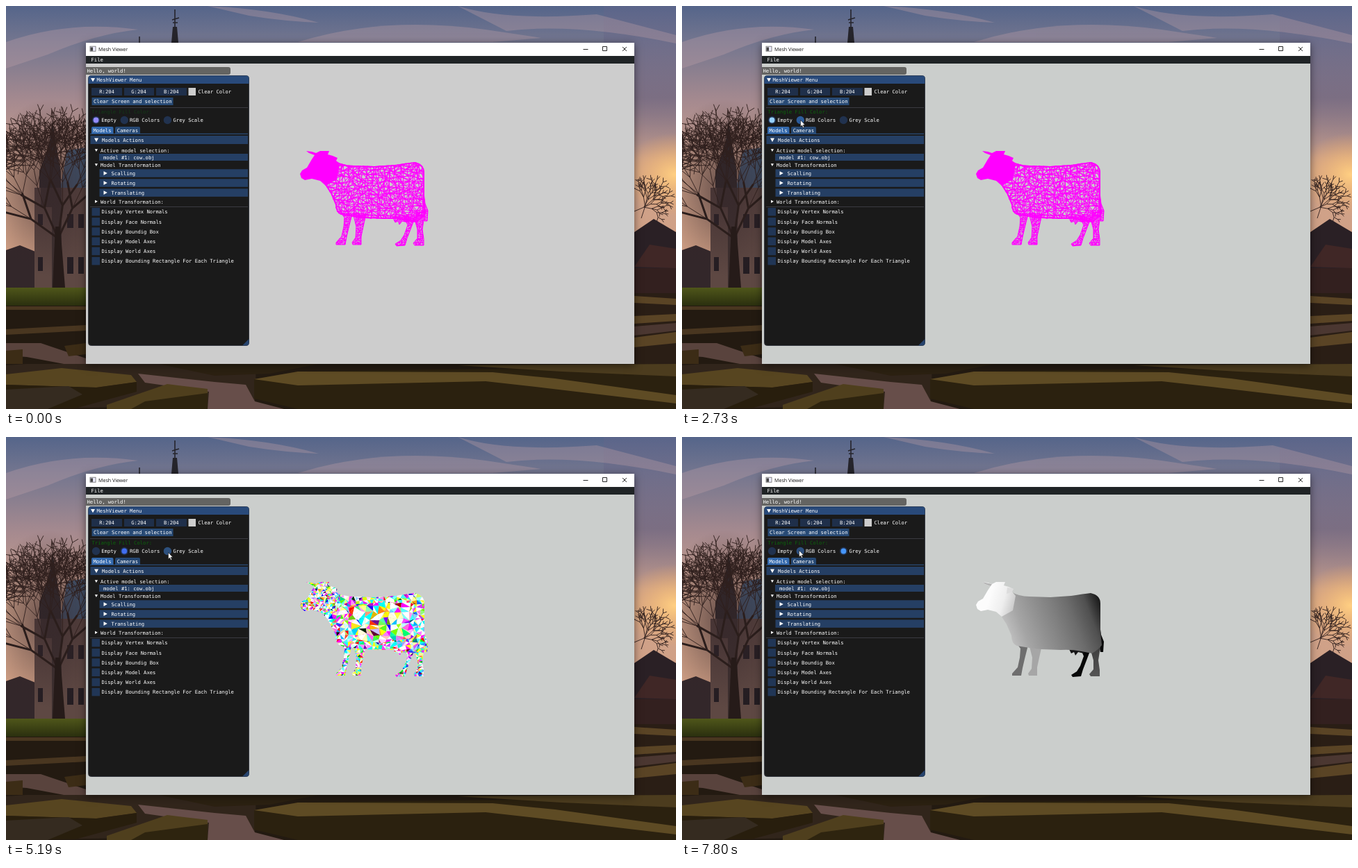
Recreate the animation shown at these times as an HTML page with a canvas. Size 964 px wide and 581 px high, loop 8000 ms.

```html
<!DOCTYPE html>
<html lang="en">
<head>
<meta charset="utf-8">
<title>Mesh Viewer</title>
<style>
html, body { margin: 0; width: 100%; height: 100%; overflow: hidden; background: #231a11; }
#stage { position: absolute; left: 0; top: 0; width: 964px; height: 581px; overflow: hidden; }
#stage > * { position: absolute; left: 0; top: 0; }
svg { display: block; }
text { font: 7.2px "DejaVu Sans Mono", "Liberation Mono", monospace; fill: #fff; text-rendering: geometricPrecision; white-space: pre; }
.title { font: 7.1px "Open Sans", "Noto Sans", sans-serif; fill: currentColor; }

#stage > #win { left: 115px; top: 53px; width: 789px; height: 463px; background: #cdcdcd; box-shadow: 0 2px 11px rgba(0,0,0,.5); }
#stage > #view { left: 421px; top: 206px; width: 190px; height: 142px; overflow: hidden; }
#mesh { display: block; }
.anim { animation: 8s step-end infinite; }

#win { animation-name: focus; }
@keyframes focus {
  .25% { box-shadow: 0 1px 6px rgba(0,0,0,.28); }
  28.625% { box-shadow: 0 2px 11px rgba(0,0,0,.5); background: #cbcecc; }
}
#bar { color: #111; animation-name: ink; }
@keyframes ink { .25% { color: #999; } 28.625% { color: #111; } }
#label { fill: #143a18; animation-name: label; }
@keyframes label { .25% { fill: #00b400; } 28.625% { fill: #0c640c; } }

.ring { fill: #21324f; }
.dot { fill: transparent; }
#dotEmpty { fill: #938bff; animation-name: empty; }
@keyframes empty { .25% { fill: #3572b5; } 28.625% { fill: #96d0ff; } 44.625% { fill: transparent; } }
#ringRgb { animation-name: ringRgb; }
@keyframes ringRgb {
  34.125% { fill: #2c5c9b; }
  39.375% { fill: #2d5fa6; }
  54.375% { fill: #21324f; }
  97.5% { fill: #2d5080; }
}
#dotRgb { animation-name: dotRgb; }
@keyframes dotRgb { 39.375% { fill: #4b8cf5; } 54.375% { fill: #416ef0; } 85.625% { fill: transparent; } }
#ringGrey { animation-name: ringGrey; }
@keyframes ringGrey { 55.25% { fill: #2d507d; } 74.375% { fill: #2d5fa6; } 80% { fill: #2d507d; } 97.5% { fill: #21324f; } }
#dotGrey { animation-name: dotGrey; }
@keyframes dotGrey { 80% { fill: #4696fa; } }

#mesh { animation-name: strip; }
@keyframes strip {
  39.375% { transform: translateY(-142px); }
  44.625% { transform: translateY(-284px); }
  50.25% { transform: translateY(-426px); }
  55.25% { transform: translateY(-568px); }
  60% { transform: translateY(-710px); }
  64.875% { transform: translateY(-852px); }
  69.5% { transform: translateY(-994px); }
  74.375% { transform: translateY(-1136px); }
  80% { transform: translateY(-1278px); }
}

#click { opacity: 0; animation-name: click; }
@keyframes click {
  24.875% { opacity: .47; transform: translate(170.5px, 164px); }
  26.375% { opacity: 0; }
  65.875% { opacity: .47; transform: translate(233px, 166px); }
  67.125% { opacity: 0; }
}
#cursor { transform: translate(-30px, -30px); animation-name: move; }
@keyframes move {
  6.25% { transform: translate(897px, 542px); animation-timing-function: steps(7); }
  10% { transform: translate(581px, 256px); animation-timing-function: steps(5); }
  12.5% { transform: translate(385px, 198px); animation-timing-function: steps(6); }
  15.875% { transform: translate(228px, 173px); }
  16.375% { transform: translate(222px, 172px); animation-timing-function: steps(7); }
  20.125% { transform: translate(174px, 165px); }
  22.125% { transform: translate(172px, 165px); }
  22.75% { transform: translate(170px, 164px); }
  44.625% { transform: translate(170px, 164px); animation-timing-function: steps(6); }
  48.5% { transform: translate(233px, 166px); }
  77.5% { transform: translate(232px, 166px); }
  85.625% { transform: translate(232px, 166px); animation-timing-function: steps(13); }
  95% { transform: translate(168px, 163px); }
}
</style>
</head>
<body>
<div id="stage">

<!-- garden backdrop -->
<svg width="964" height="581">
  <defs>
    <linearGradient id="sky" x2="0" y2="1">
      <stop offset="0" stop-color="#55658a"/><stop offset=".12" stop-color="#74768f"/>
      <stop offset=".32" stop-color="#a68a8f"/><stop offset=".55" stop-color="#d0a48c"/>
      <stop offset="1" stop-color="#cf9c80"/>
    </linearGradient>
    <linearGradient id="dusk" x2="0" y2="1">
      <stop offset="0" stop-color="#66658a" stop-opacity=".3"/><stop offset=".6" stop-color="#66607c" stop-opacity=".65"/>
      <stop offset="1" stop-color="#66607c" stop-opacity="0"/>
    </linearGradient>
    <radialGradient id="glow"><stop offset="0" stop-color="#ffcf82"/><stop offset="1" stop-color="#f0a860" stop-opacity="0"/></radialGradient>
    <radialGradient id="crown"><stop offset=".2" stop-color="#35262a" stop-opacity=".55"/><stop offset="1" stop-color="#35262a" stop-opacity="0"/></radialGradient>
    <linearGradient id="grass" x2="0" y2="1"><stop offset="0" stop-color="#4f561a"/><stop offset="1" stop-color="#282c0e"/></linearGradient>
  </defs>
  <rect width="964" height="432" fill="url(#sky)"/>
  <rect x="860" width="104" height="220" fill="url(#dusk)"/>
  <g fill="#bd9fa6" opacity=".35">
    <path d="M0 52Q90 20 190 34Q130 40 60 70L0 90Z"/>
    <path d="M290 0Q380 4 450 24Q400 22 350 14Z"/>
    <path d="M420 52Q540 14 690 34L770 46 700 52Z"/>
    <path d="M650 0Q720 22 850 12L964 42V54Q820 24 720 36Z"/>
  </g>
  <ellipse cx="962" cy="243" rx="75" ry="60" fill="url(#glow)"/>
  <path d="M243 5V52M239 20L249 17M240 24H247M192 44V53" stroke="#25242b" stroke-width="1.6"/>
  <path d="M240 30H246L248 53H238Z" fill="#25242b"/>

  <path d="M0 352L20 345 42 354V406H0Z" fill="#33272a"/>
  <path d="M41 262H115V406H41Z" fill="#5e4843"/>
  <path d="M78 262L88 208 116 204V262Z" fill="#435a76"/>
  <path d="M62 200L67 165 72 200 79 238V262H48V238Z" fill="#2b2527"/>
  <path d="M50 262H80V406H66V290H50Z" fill="#3d302f"/>
  <path d="M46 300h7v16h-7zM46 362h7v20h-7zM88 300h9v20h-9zM88 362h9v24h-9zM104 300h8v20h-8zM104 362h8v24h-8z" fill="#241d22"/>
  <ellipse cx="62" cy="262" rx="92" ry="128" fill="url(#crown)"/>
  <path id="limbs" fill="none" stroke="#2b1e1c" stroke-width="3" stroke-linecap="round"/>
  <path id="twigs" fill="none" stroke="#2f201d" stroke-width=".9"/>
  <path d="M67 406L71 318H78L85 406Z" fill="#261b19"/>

  <path d="M904 326L932 307 964 326V416H904Z" fill="#2a2025"/>
  <path d="M904 376L926 344 964 350V378Z" fill="#402726"/>
  <path d="M904 378H964V416H904Z" fill="#33201f"/>

  <rect y="406" width="120" height="28" fill="url(#grass)"/>
  <rect y="432" width="964" height="149" fill="#231a11"/>
  <rect x="900" y="414" width="64" height="102" fill="#2a1e15"/>
  <path d="M904 418L964 422V431L904 428ZM904 447L964 444V454L904 458ZM904 478L964 470V486L904 492Z" fill="#5a4425"/>
  <path d="M904 462L964 457V468L904 475Z" fill="#4b3731"/>
  <path d="M0 433H115V438H0ZM0 466L115 460V468L0 474Z" fill="#493620"/>
  <path d="M0 486L50 486 115 508V522L30 506 0 504Z" fill="#59433d"/>
  <path d="M0 497L24 495V516H0ZM84 490L115 486V502L90 505Z" fill="#3c2c16"/>
  <path d="M30 516H360L358 575 0 581V518Z" fill="#31251b"/>
  <path d="M0 531L80 522 180 532 188 542 130 550 0 546Z" fill="#574520"/>
  <path d="M0 546L130 550 188 542V556L100 580H0Z" fill="#281e0d"/>
  <path d="M0 553L90 548 110 560 60 581H0Z" fill="#352b20"/>
  <path d="M190 530L300 542 345 546 358 570 400 581H290L292 556 200 543Z" fill="#674e4a"/>
  <path d="M220 516H450L380 530 300 533Z" fill="#2b2011"/>
  <path d="M145 575L232 545 290 552V581H145Z" fill="#4f3f1d"/>
  <path d="M200 570L290 558V581H180Z" fill="#2e240f"/>
  <path d="M357 538L420 527 640 524 964 520V581H420L357 566Z" fill="#2b210f"/>
  <path d="M357 538L420 527 700 528 790 537 964 561V573L770 550 690 541 420 547Z" fill="#5e4b24"/>
  <path d="M650 518L964 516V534L800 527Z" fill="#4c3c1e"/>
</svg>

<div id="win" class="anim"></div>

<!-- application window -->
<svg width="964" height="581">
  <rect x="115" y="53" width="789" height="19" fill="#fff"/>
  <g id="bar" class="anim" fill="none" stroke="currentColor" stroke-width=".9">
    <text class="title" stroke="none" x="133" y="65">Mesh Viewer</text>
    <rect x="121" y="58.2" width="8" height="7" fill="#eef" stroke="#777"/>
    <rect x="121.5" y="59.5" width="3.6" height="5.2" fill="#444" stroke="none"/>
    <path d="M830.500 62.500H837.500M858.500 58.500H864.500V64.500H858.500ZM887 59L893 65M893 59L887 65"/>
  </g>
  <rect x="115" y="72" width="789" height="11" fill="#202426"/>
  <text x="122.500" y="80.300">File</text>
  <path d="M115 88H320Q323 88 323 91V96Q323 99 320 99H115Z" fill="#646462"/>
  <text x="116.500" y="96.300">Hello, world!</text>

  <rect x="118.500" y="100.500" width="231" height="389" rx="4" fill="#1a1a1a" stroke="#34373f"/>
  <path d="M118.500 112V104Q118.500 100.500 122 100.500H346Q349.500 100.500 349.500 104V112Z" fill="#294a7a"/>
  <path d="M349.500 480V486Q349.500 489.500 346 489.500H340Z" fill="#27446e"/>

  <g fill="#1f2f4a">
    <rect x="123" y="118" width="44" height="11"/><rect x="170" y="118" width="43" height="11"/><rect x="216" y="118" width="44" height="11"/>
  </g>
  <rect x="262.500" y="118" width="10.500" height="11" fill="#cdcdcd"/>
  <rect x="123.500" y="132" width="117" height="11" fill="#284a75"/>
  <path d="M121 146.500H348M121 289.500H348" stroke="#43434c" stroke-width=".8"/>
  <path d="M123 184V176Q123 174 125 174H152.500Q154.500 174 154.500 176V184Z" fill="#3369ad"/>
  <path d="M157 184V176Q157 174 159 174H191Q193 174 193 176V184Z" fill="#264873"/>
  <path d="M121 184.300H348" stroke="#3369ad" stroke-width=".8"/>
  <g fill="#253f64">
    <rect x="121.500" y="187" width="226.500" height="12"/>
    <rect x="134" y="213" width="214" height="10"/>
    <rect x="134.500" y="235.300" width="213.500" height="11.500"/><rect x="134.500" y="249.300" width="213.500" height="11.500"/><rect x="134.500" y="263.400" width="213.500" height="11.500"/>
  </g>
  <g fill="#fff">
    <path d="M122 104H128L125 109.300ZM127 190.600H133L130 195.900Z"/>
    <path d="M127.800 206.200H132L129.900 210ZM127.800 227.200H132L129.900 231Z"/>
    <path d="M140.500 238.200V244L145.800 241.100ZM140.500 252.200V258L145.800 255.100ZM140.500 266.200V272L145.800 269.100ZM128 279.700V284L131.900 281.850Z"/>
  </g>
  <g id="boxes" fill="#213656"></g>

  <g>
    <circle class="ring" cx="129.500" cy="164.500" r="5.700"/><circle id="dotEmpty" class="dot anim" cx="129.500" cy="164.500" r="3.900"/>
    <circle id="ringRgb" class="ring anim" cx="170.300" cy="164.500" r="5.700"/><circle id="dotRgb" class="dot anim" cx="170.300" cy="164.500" r="3.900"/>
    <circle id="ringGrey" class="ring anim" cx="232.400" cy="164.500" r="5.700"/><circle id="dotGrey" class="dot anim" cx="232.400" cy="164.500" r="3.900"/>
  </g>

  <text x="130.500" y="109.200">MeshViewer Menu</text>
  <text x="134.300" y="126.200">R:204</text><text x="180.300" y="126.200">G:204</text><text x="227" y="126.200">B:204</text>
  <text x="276.500" y="126.200">Clear Color</text>
  <text x="126" y="140.300">Clear Screen and selection</text>
  <text id="label" class="anim" x="123.500" y="155.200">Triangle Fill Color:</text>
  <text x="137.300" y="167.300">Empty</text><text x="178" y="167.300">RGB Colors</text><text x="240.500" y="167.300">Grey Scale</text>
  <text x="125.500" y="181.700">Models</text><text x="159.700" y="181.700">Cameras</text>
  <text x="138" y="195.800">Models Actions</text>
  <text x="136" y="210.600">Active model selection:</text>
  <text x="140" y="220.900">model #1: cow.obj</text>
  <text x="136" y="231.700">Model Transformation</text>
  <text x="151.500" y="243.800">Scalling</text>
  <text x="151.500" y="257.800">Rotating</text>
  <text x="151.500" y="271.900">Translating</text>
  <text x="136" y="284.700">World Transformation:</text>
  <text x="137.500" y="299.300">Display Vertex Normals</text>
  <text x="137.500" y="313.500">Display Face Normals</text>
  <text x="137.500" y="327.700">Display Boundig Box</text>
  <text x="137.500" y="341.900">Display Model Axes</text>
  <text x="137.500" y="356.100">Display World Axes</text>
  <text x="137.500" y="370.300">Display Bounding Rectangle For Each Triangle</text>
</svg>

<div id="view"><canvas id="mesh" class="anim" width="190" height="1420"></canvas></div>

<svg width="964" height="581">
  <circle id="click" class="anim" r="7.500" fill="#ff0"/>
  <g id="cursor" class="anim"><path d="M.5 .5V9.900L2.600 8 4.100 11.500 5.700 10.800 4.200 7.500H7.100Z" fill="#fff" stroke="#111" stroke-width=".6"/></g>
</svg>
</div>

<script>
const $ = id => document.getElementById(id);
const hash = (a, b, c) => {
  const v = Math.sin(a * 127.1 + b * 311.7 + c * 74.7) * 43758.5453;
  return v - Math.floor(v);
};

// check boxes
$('boxes').innerHTML = [0, 1, 2, 3, 4, 5].map(i =>
  `<rect x="123.5" y="${290.9 + i * 14.2}" width="11.5" height="11.5"/>`).join('');

// bare trees
let limbs = '', twigs = '', count = 0;
function branch(x, y, angle, len, depth) {
  const r = hash(++count, depth, 3), a = angle + (r - .5) * .35;
  const x2 = x + Math.cos(a) * len, y2 = y + Math.sin(a) * len;
  const line = `M${x.toFixed(1)} ${y.toFixed(1)}L${x2.toFixed(1)} ${y2.toFixed(1)}`;
  if (depth > 5) limbs += line; else twigs += line;
  if (!depth) return;
  const spread = .35 + r * .3;
  branch(x2, y2, a - spread, len * (.74 + r * .1), depth - 1);
  branch(x2, y2, a + spread, len * (.84 - r * .1), depth - 1);
  if (depth > 3) branch(x2, y2, a, len * .7, depth - 2);
}
for (const lean of [-2.5, -2, -1.57, -1.1]) branch(75, 335, lean, 48, 7);
branch(914, 306, -1.1, 18, 5);
branch(904, 296, -.5, 15, 5);
$('limbs').setAttribute('d', limbs);
$('twigs').setAttribute('d', twigs);

// cow
const head = new Path2D('M432 209L440 210 446 212 452 209 465 209 463 214 470 216 477 219 475 223 480 229 476 250 460 259 452 252 440 249 430 251 425 248 423 242 426 237 433 233 440 221 444 215 436 212Z');
const body = new Path2D('M472 222Q484 230 500 230L530 231 560 229Q578 226 588 225Q602 228 602 240L602 280 604 300Q600 306 590 312L575 309Q560 306 545 307L517 306 500 304 482 301Q474 298 474 286L467 270 458 256Z');
const foreFar = new Path2D('M482 298L487 305 486 318 483 332 475 341 475 344 488 344 490 333 493 320 498 300Z');
const foreNear = new Path2D('M499 298L504 318 503 334 498 341 499 344 511 344 511 332 514 318 518 300Z');
const hindFar = new Path2D('M572 302L578 316 573 330 568 338 560 343 562 346 574 345 577 335 582 322 588 306Z');
const hindNear = new Path2D('M586 300L592 322 592 335 586 342 588 345 601 345 601 336 599 322 603 296Z');
const tail = new Path2D('M600 262L603 285 607 295 606 310 602 310 600 300Z');
const udder = new Path2D('M556 304L560 312 564 310 566 315 570 310 578 312 580 304Z');
const flank = new Path2D('M494 244L530 239 582 239 588 262 582 290 540 297 505 292 492 270Z');
const limbParts = [foreFar, hindFar, tail, udder, foreNear, hindNear];
const ctx = $('mesh').getContext('2d');

// jittered triangles of a given size, clipped to one part
function triangles(part, size, salt, paint) {
  const corner = (i, j) => [
    421 + (i + hash(i, j, salt) * .8 - .4) * size * 1.1,
    206 + (j + hash(j, i, salt + 9) * .8 - .4) * size
  ];
  ctx.save();
  ctx.clip(part);
  for (let i = -1; i * size * 1.1 < 195; i++) for (let j = -1; j * size < 147; j++) {
    const a = corner(i, j), b = corner(i + 1, j), c = corner(i + 1, j + 1), d = corner(i, j + 1);
    const pair = hash(i, j, salt + 5) < .5 ? [[a, b, c], [a, c, d]] : [[a, b, d], [b, c, d]];
    pair.forEach((tri, k) => {
      ctx.beginPath();
      tri.forEach(p => ctx.lineTo(...p));
      ctx.closePath();
      paint(i, j, k);
    });
  }
  ctx.restore();
}

function wire() {
  const stroke = () => ctx.stroke();
  ctx.strokeStyle = ctx.fillStyle = '#f0f';
  ctx.lineWidth = .75;
  ctx.fill(head);
  limbParts.forEach(p => triangles(p, 3, 2, stroke));
  triangles(body, 6, 1, stroke);
  triangles(body, 8, 4, stroke);
  ctx.save();
  ctx.clip(body);
  ctx.lineWidth = 4;
  ctx.stroke(body);
  ctx.restore();
  ctx.lineWidth = 1;
  limbParts.forEach(p => ctx.stroke(p));
}

function confetti(seed) {
  const fill = salt => (i, j, k) => {
    const level = n => Math.max(0, Math.min(255, (hash(i + seed * 13, j + k * 57, n + salt) * 3 - .35) * 255 | 0));
    ctx.fillStyle = `rgb(${level(1)},${level(2)},${level(3)})`;
    ctx.fill();
  };
  limbParts.forEach(p => triangles(p, 3.5, 2, fill(20)));
  triangles(body, 5, 1, fill(30));
  triangles(flank, 8, 4, fill(40));
  triangles(head, 3.2, 6, fill(50));
}

function ramp(x1, y1, x2, y2, ...stops) {
  const g = ctx.createLinearGradient(x1, y1, x2, y2);
  stops.forEach((v, i) => g.addColorStop(i / (stops.length - 1), `rgb(${v},${v},${v})`));
  return g;
}

function depth() {
  const shade = (part, fill) => { ctx.fillStyle = fill; ctx.fill(part); };
  shade(foreFar, '#6e6e6e');
  shade(hindFar, '#080808');
  shade(tail, '#0a0a0a');
  shade(udder, '#151515');
  shade(hindNear, ramp(590, 300, 596, 345, 60, 85));
  shade(foreNear, '#a6a6a6');
  shade(body, ramp(465, 278, 602, 226, 194, 165, 146, 128, 108, 80, 14));
  shade(head, ramp(442, 232, 482, 244, 252, 238, 194));
  shade(new Path2D('M432 209L446 212 444 215 436 212Z'), '#b4b4b4');
  shade(new Path2D('M468 217L477 219 474 224 467 226Z'), '#dcdcdc');
}

for (let k = 0; k < 10; k++) {
  ctx.save();
  ctx.translate(-421, k * 142 - 206);
  ctx.beginPath();
  ctx.rect(421, 206, 190, 142);
  ctx.clip();
  if (!k) wire(); else if (k < 9) confetti(k); else depth();
  ctx.restore();
}
</script>
</body>
</html>
```
